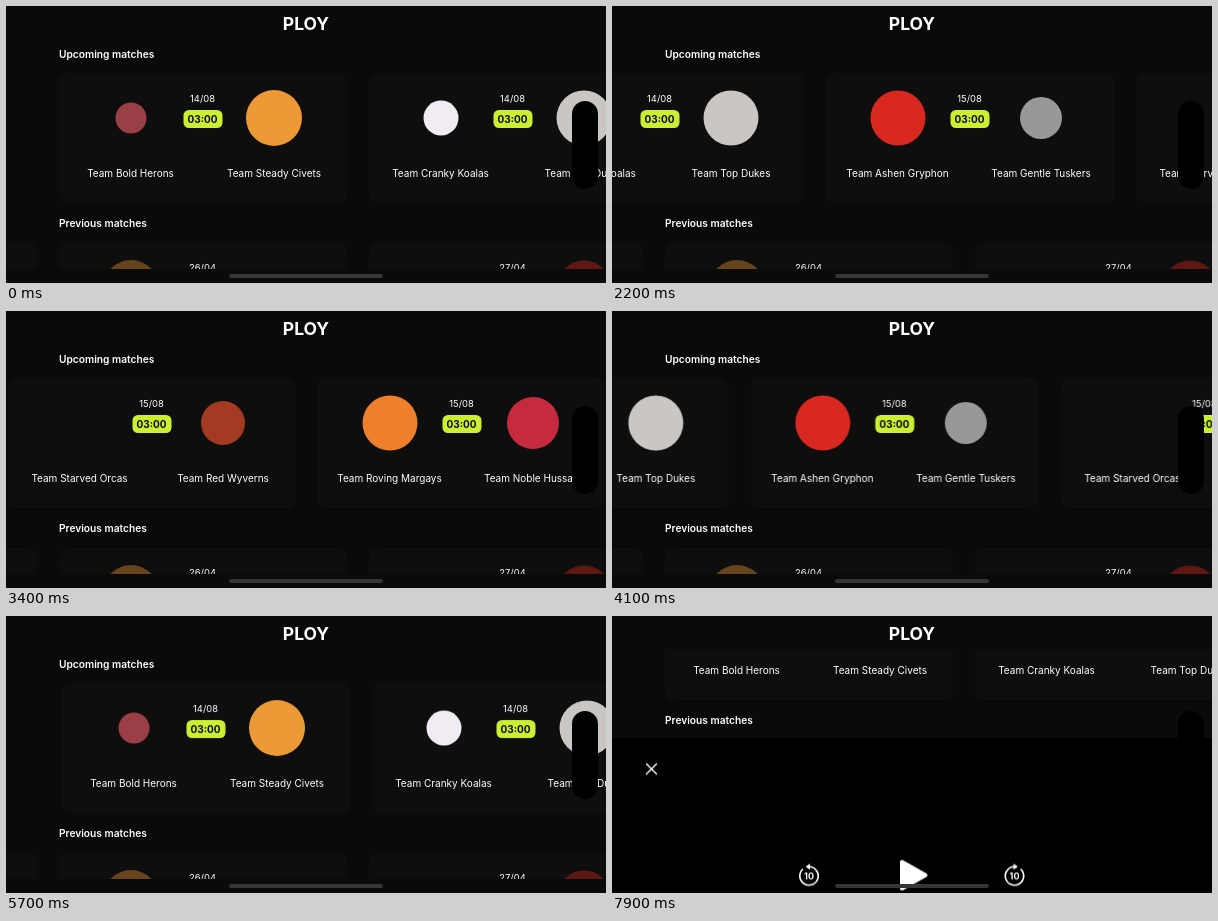
An HTML page that plays this animation: 600 px wide and 277 px high, repeating every 8 s.

```html
<!DOCTYPE html>
<html lang="en">
<head>
<meta charset="utf-8">
<title>Matches</title>
<style>
  html, body { margin: 0; width: 100%; height: 100%; overflow: hidden; background: #0a0a0a; }
  body { position: relative; color: #fff; font: 10px/14px Inter, "Open Sans", sans-serif; white-space: nowrap; }
  .layer { position: absolute; left: 0; top: 0; width: 600px; height: 277px; }
  .at { position: absolute; transform: translate(-50%, -50%); }
  .title { left: 300px; top: 17.5px; font-size: 17.5px; font-weight: 700; }
  .view { clip-path: inset(33px 0 14px); }
  .page { animation: page 8s infinite; }
  .row { animation: swipe 8s infinite; }
  h2 { position: absolute; left: 53px; margin: 0; font: 600 10.2px/14px Inter, "Open Sans", sans-serif; }
  .card { position: absolute; width: 288px; border-radius: 8px; background: #0e0e0e; }
  .next { top: 67px; height: 130px; }
  .past { top: 237px; height: 139px; }
  .date { left: 143.5px; top: 26px; font-size: 9.4px; }
  .time { left: 143.5px; top: 46px; width: 39px; height: 18px; border-radius: 5.5px; background: #cbf032;
          color: #0a0a0a; font-weight: 700; line-height: 18px; text-align: center; }
  .logo { top: 45px; border-radius: 50%; }
  .name { top: 100px; }
  .past .date { top: 25px; }
  .past .time { top: 45px; background: #7c922b; }
  .past .name { top: 91px; }
  .lost { opacity: .32; }
  .logo.lost { opacity: .4; }
  .watch { position: absolute; left: 98px; top: 110px; width: 91px; height: 29px; border-radius: 8px 8px 0 0;
           background: #060606; font-size: 8.7px; line-height: 30px; text-indent: 17px; }
  .watch::before { content: ""; position: absolute; left: 5px; top: 12px; width: 6px; height: 6px;
                   border-radius: 50%; background: #f0192f; }
  .thumb { position: absolute; left: 562px; top: 123px; width: 2px; height: 118px; border-radius: 1px;
           background: #000; opacity: 0; animation: thumb 8s infinite; }
  .notch { position: absolute; left: 566px; top: 95px; width: 26px; height: 88px; border-radius: 13px; background: #000; }
  .sheet { background: #000; animation: sheet 8s linear infinite; }
  .home { position: absolute; left: 223px; top: 267.5px; width: 154px; height: 4px; border-radius: 2px; background: #353537; }

  @keyframes swipe {
    0%, 10.6% { transform: translateX(0); animation-timing-function: cubic-bezier(.25, .45, .35, 1); }
    26.9% { transform: translateX(-459px); }
    28.7% { transform: translateX(-459px); animation-timing-function: cubic-bezier(.25, .45, .35, 1); }
    42.5% { transform: translateX(-981px); }
    46.2% { transform: translateX(-981px); animation-timing-function: cubic-bezier(.3, .4, .65, .92); }
    60% { transform: translateX(-59px); animation-timing-function: cubic-bezier(.2, .6, .4, 1); }
    64.4% { transform: translateX(14px); animation-timing-function: cubic-bezier(.4, 0, .5, .9); }
    71.25% { transform: translateX(3px); animation-timing-function: ease-out; }
    76%, 100% { transform: translateX(0); }
  }
  @keyframes page {
    0%, 79% { transform: translateY(0); animation-timing-function: cubic-bezier(.3, .4, .4, 1); }
    82.5%, 100% { transform: translateY(-113px); }
  }
  @keyframes thumb {
    0%, 79% { opacity: 0; }
    80%, 85% { opacity: .35; }
    87.5%, 100% { opacity: 0; }
  }
  @keyframes sheet {
    0%, 95.4% { transform: translateY(277px); }
    96.25% { transform: translateY(256px); }
    97.5% { transform: translateY(195px); }
    98.75% { transform: translateY(123px); }
    100% { transform: translateY(68px); }
  }
</style>
</head>
<body>
<div class="layer view">
  <div class="layer page">
    <h2 style="top:41px">Upcoming matches</h2>
    <div class="layer row" id="next"></div>
    <h2 style="top:210px">Previous matches</h2>
    <div class="layer" id="past"></div>
  </div>
</div>
<div class="at title">PLOY</div>
<div class="thumb"></div>
<div class="notch"></div>
<div class="layer sheet">
  <svg width="600" height="277" fill="none" stroke="#fff">
    <defs>
      <g id="turn">
        <path d="M0-9.2A9.2 9.2 0 1 1-6.5-6.5" stroke-width="1.6" stroke-linecap="round"/>
        <path d="M-3.4-9.2 1-12.2V-6.2Z" fill="#fff" stroke="none"/>
      </g>
    </defs>
    <path d="M34.5 25.5l10 10m0-10l-10 10" stroke-width="1.4" stroke-linecap="round"/>
    <use href="#turn" x="197" y="137.5"/>
    <use href="#turn" transform="translate(402.5 137.5) scale(-1 1)"/>
    <g fill="#fff" stroke="none" font-size="9" font-weight="700" text-anchor="middle">
      <text x="197" y="141">10</text>
      <text x="402.5" y="141">10</text>
    </g>
    <path d="M290 123.5V150L313.5 136.7Z" fill="#fff" stroke-width="4" stroke-linejoin="round"/>
  </svg>
</div>
<div class="home"></div>
<script>
  // key: [name, logo colour, logo size]
  const teams = {
    heron: ['Bold Herons', '#9a3f45', 31],
    civet: ['Steady Civets', '#ec9a36', 56],
    koala: ['Cranky Koalas', '#f1ebf3', 35],
    duke: ['Top Dukes', '#c9c6c4', 55],
    gryphon: ['Ashen Gryphon', '#d8281f', 55],
    tusker: ['Gentle Tuskers', '#98989a', 42],
    orca: ['Starved Orcas', '#98a3ae', 34],
    wyvern: ['Red Wyverns', '#a53a22', 44],
    margay: ['Roving Margays', '#ee7f2d', 55],
    hussar: ['Noble Hussars', '#c52a3e', 52]
  };
  const PITCH = 310;

  function side(key, x, { lost, bare } = {}) {
    const [name, color, size] = teams[key];
    const dim = lost ? ' lost' : '';
    const logo = bare ? '' :
      `<div class="at logo${dim}" style="left:${x}px;width:${size}px;height:${size}px;background:${color}"></div>`;
    return logo + `<div class="at name${dim}" style="left:${x}px">Team ${name}</div>`;
  }

  function addCard(list, slot, date, time, left, right) {
    const card = document.createElement('div');
    card.className = 'card ' + list;
    card.style.left = 53 + slot * PITCH + 'px';
    card.innerHTML = `<div class="at date">${date}</div><div class="at time">${time}</div>` +
      left + right + (list === 'past' ? '<div class="watch">Watch highlights</div>' : '');
    document.getElementById(list).append(card);
  }

  const L = 71.5, R = 215, lost = { lost: true };
  [
    ['14/08', 'heron', 'civet'],
    ['14/08', 'koala', 'duke'],
    ['15/08', 'gryphon', 'tusker'],
    ['15/08', 'orca', 'wyvern'],
    ['15/08', 'margay', 'hussar']
  ].forEach(([date, a, b], i) =>
    addCard('next', i, date, '03:00', side(a, L, { bare: a === 'orca' }), side(b, R)));

  addCard('past', -1, '26/04', '01:00', side('heron', L), side('margay', R, lost));
  addCard('past', 0, '26/04', '01:00', side('civet', L, lost), side('orca', R));
  addCard('past', 1, '27/04', '01:00', side('koala', L), side('gryphon', R, lost));
</script>
</body>
</html>
```
